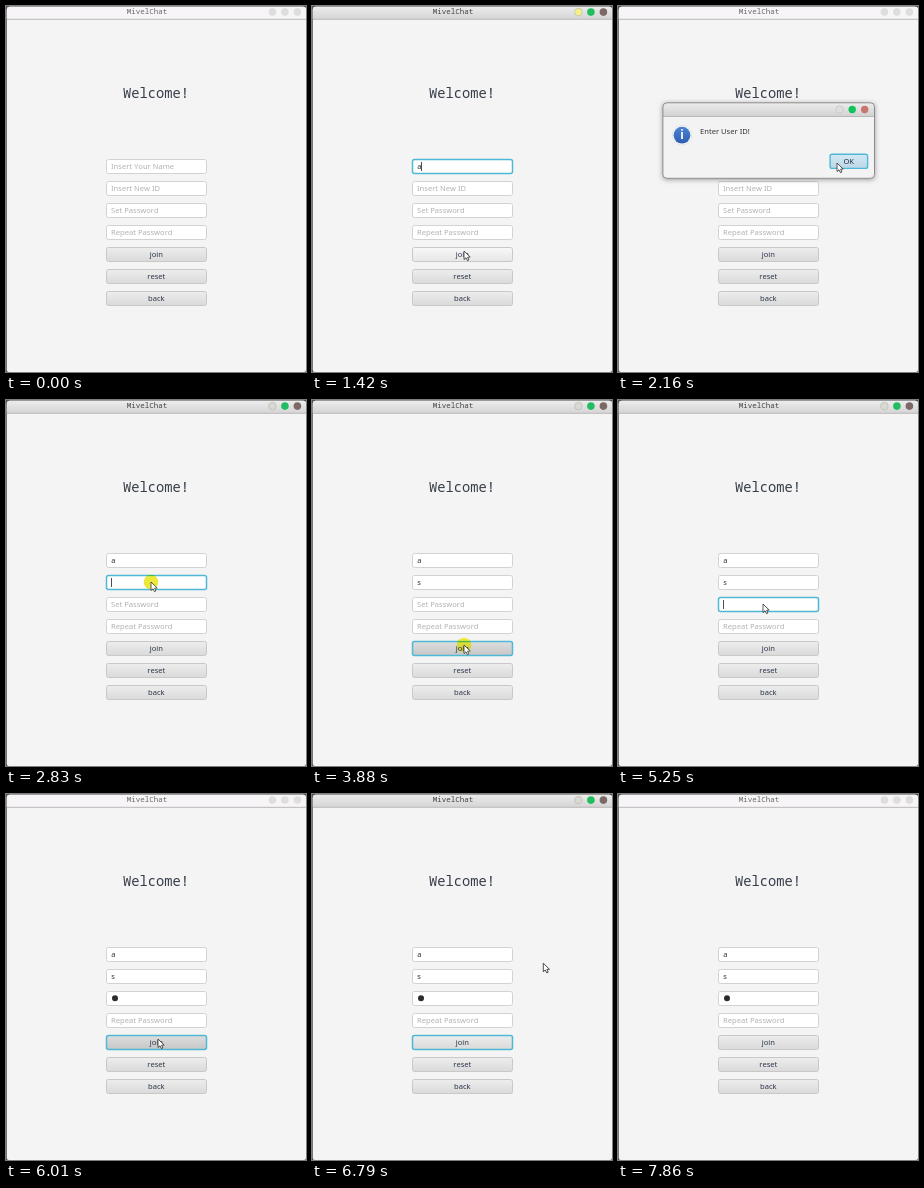
Animation, 300 px wide and 366 px high, one loop 7.96 s. Source, as an HTML page with a canvas:

```html
<!DOCTYPE html>
<html lang="en">
<head>
<meta charset="utf-8">
<title>Join form</title>
<style>
html, body { margin: 0; height: 100%; overflow: hidden; background: #f4f4f4; }
canvas { display: block; }
</style>
</head>
<body>
<canvas id="stage" width="300" height="366"></canvas>
<script>
const c = document.getElementById('stage').getContext('2d');
c.fontKerning = 'none';
const LOOP = 7960, SHOWN = 30, HIDDEN = 7860;
const SANS = '7.6px "Noto Sans", sans-serif';
const MONO = '"Noto Sans Mono", monospace';
const BLUE = '#4fb8d6';
const prompts = ['Insert Your Name', 'Insert New ID', 'Set Password', 'Repeat Password'];
const rowY = i => 153 + 22 * i;

// Each round: click a field, type one character, press join, then confirm the dialog if there is one.
const rounds = [
  { focus: 700, type: 930, join: 1570, end: 2530, char: 'a', ask: 'Enter User ID!', ok: [219, 157] },
  { focus: 2800, type: 3130, join: 3800, end: 4580, char: 's', ask: 'Enter User Password!', ok: [231, 163] },
  { focus: 5150, type: 5350, join: 5800, end: 6580, char: '●', ask: 'Repeat User Password!', ok: [229, 158] }
];
for (const round of rounds) {
  round.blur = round.join + 100;
  round.open = round.join + 220;
  round.press = round.end - 190;
}

const clamp = v => Math.max(0, Math.min(1, v));
const ease = u => u * u * (3 - 2 * u);
const within = (t, from, to) => t >= from && t < to;

// Pointer moves: [start, end, destination]
const moves = rounds.flatMap(({ focus, type, join, open, ok }, i) => [
  [i ? focus - 250 : SHOWN, focus - 30, [145, rowY(i) + 7]],
  [type + 100, type + 400, [152, 245]],
  [open + 30, open + 340, ok]
]);
moves.push([6650, 7660, [272, 370]]);

function pointerAt(t) {
  let x = 262, y = 366;
  for (const [from, to, [endX, endY]] of moves) {
    const k = ease(clamp((t - from) / (to - from)));
    x += (endX - x) * k;
    y += (endY - y) * k;
  }
  return [x, y];
}

function vertical(y, h, top, bottom) {
  const g = c.createLinearGradient(0, y, 0, y + h);
  g.addColorStop(0, top);
  g.addColorStop(1, bottom);
  return g;
}

function paint(fill, stroke, line = 1) {
  c.fillStyle = fill;
  c.fill();
  if (!stroke) return;
  c.strokeStyle = stroke;
  c.lineWidth = line;
  c.stroke();
}

function box(x, y, w, h, r, ...colors) {
  c.beginPath();
  c.roundRect(x, y, w, h, r);
  paint(...colors);
}

function dot(x, y, r, ...colors) {
  c.beginPath();
  c.arc(x, y, r, 0, 2 * Math.PI);
  paint(...colors);
}

function label(text, x, y, color, font = SANS, align = 'left') {
  c.font = font;
  c.textAlign = align;
  c.fillStyle = color;
  c.fillText(text, x, y);
}

function drawWindow(t, active) {
  c.fillStyle = '#555';
  c.fillRect(0, 0, 300, 366);
  box(0.8, 0.8, 299.2, 365.2, [3, 3, 2, 2], '#f4f4f4');
  box(0.8, 0.8, 299.2, 12.2, [3, 3, 0, 0], active ? vertical(0, 13, '#eeeeee', '#d6d4d6') : '#f7f5f7');
  c.fillStyle = '#bbb8b6';
  c.fillRect(1, 12.8, 299, 1);
  label('MivelChat', 141, 8.3, active ? '#444' : '#686868', `7.5px ${MONO}`, 'center');
  const minimize = t < rounds[0].blur ? '#f3f08c' : '#d8d8d4';
  [minimize, '#22bd60', '#7c6864'].forEach((color, i) =>
    dot(266.4 + 12.5 * i, 6.1, 3.8, active ? color : '#dedede', active && !i && '#bcbcae', 0.7));
  label('Welcome!', 150, 91.5, '#363d48', `13.75px ${MONO}`, 'center');
}

function drawField(prompt, i, t, focused) {
  const y = rowY(i), round = rounds[i];
  const text = round && t >= round.type ? round.char : '';
  const isDot = text === '●';
  box(100.5, y + 0.5, 100, 14, 2, '#fff', focused ? BLUE : '#d2d2d2', focused ? 1.5 : 1);
  if (isDot) dot(109, y + 7.3, 3, '#2c2c2c');
  else if (text) label(text, 105.3, y + 10.2, '#333');
  else if (!focused) label(prompt, 105, y + 10.2, '#b1b1b1');
  if (focused) {
    c.fillStyle = '#222';
    c.fillRect(105 + (isDot ? 8 : 4 * text.length), y + 3, 0.8, 9);
  }
}

function drawButton(text, y, top, bottom, focused) {
  box(100.5, y + 0.5, 100, 14, 2, vertical(y, 15, top, bottom), focused ? BLUE : '#c8c8c8', focused ? 1.5 : 1);
  label(text, 150.3, y + 10.1, '#2b3648', SANS, 'center');
}

function drawDialog({ open, press, end, ask }, t) {
  if (!within(t, open, end)) return;
  c.save();
  c.globalAlpha = clamp((t - open) / 110) * clamp((end - t) / 30);
  c.shadowColor = 'rgba(0,0,0,.4)';
  c.shadowBlur = 5;
  c.shadowOffsetY = 1;
  box(44.7, 96.5, 212, 76, 4, '#f3f3f3');
  c.shadowColor = 'transparent';
  box(45, 97, 211.4, 13, [4, 4, 0, 0], vertical(97, 13, '#ececec', '#d2d2d2'));
  c.fillStyle = '#b8b8b8';
  c.fillRect(45, 110, 211, 1);
  box(44.9, 96.8, 211.6, 75.5, 4, 'transparent', '#8c8c8c');
  ['#dedede', '#12c45c', '#cb7470'].forEach((color, i) =>
    dot(221.7 + 12.5 * i, 103.5, 3.7, color, !i && '#c2c2c2', 0.7));
  dot(64, 129.2, 9.8, '#fafafa', '#d8dbe0', 0.7);
  dot(64, 129.2, 8.4, vertical(121, 17, '#4c82d2', '#2e5db2'));
  label('i', 64, 133.4, '#fff', 'bold 11.5px "Noto Sans", sans-serif', 'center');
  label(ask, 82, 128.2, '#333');
  const fill = t < press ? vertical(148, 15, '#d6e9f3', '#b9d6e6') : vertical(148, 15, '#acd4e7', '#94c5dd');
  box(212.1, 148.2, 37.5, 14.2, 2, fill, BLUE, 1.4);
  label('OK', 230.7, 158.1, '#2b3648', SANS, 'center');
  c.restore();
}

function drawPointer(t) {
  if (!within(t, SHOWN, HIDDEN)) return;
  const [x, y] = pointerAt(t);
  c.save();
  c.translate(x, y);
  if (rounds.some(r => [r.focus, r.join, r.press].some(time => within(t, time, time + 85)))) {
    c.globalCompositeOperation = 'darken';
    dot(0, 0, 7.3, '#eee83c');
    c.globalCompositeOperation = 'source-over';
  }
  c.fill(arrow);
  c.beginPath();
  c.fillStyle = '#fff';
  c.fill(arrow);
  c.strokeStyle = '#333';
  c.lineWidth = 0.8;
  c.stroke(arrow);
  c.restore();
}
const arrow = new Path2D('M0 0V8.5L2 6.8 3.5 9.6 4.9 8.9 3.6 6.2 6.2 6Z');

function draw(t) {
  const active = within(t, SHOWN, HIDDEN) && !rounds.some(r => within(t, r.blur, r.end));
  const inDialog = rounds.some(r => within(t, r.open, r.end));
  const pressed = rounds.some(r => within(t, r.join, r.open));
  const hovered = within(t, rounds[0].type + 380, rounds[0].join);
  const typing = rounds.findIndex(r => within(t, r.focus, r.join));
  const joinFocused = typing < 0 && within(t, rounds[0].join, HIDDEN) && !inDialog;
  drawWindow(t, active);
  prompts.forEach((prompt, i) => drawField(prompt, i, t, typing === i));
  const face = ['#eeeeee', '#d9d9d9'];
  const joinFace = pressed ? ['#dedede', '#c6c6c6'] : hovered ? ['#f8f8f8', '#e6e6e6'] : face;
  drawButton('join', rowY(4), ...joinFace, joinFocused);
  drawButton('reset', rowY(5), ...face);
  drawButton('back', rowY(6), ...face);
  rounds.forEach(round => drawDialog(round, t));
  drawPointer(t);
}

const start = performance.now();
function frame() {
  draw((performance.now() - start) % LOOP);
  requestAnimationFrame(frame);
}
frame();
</script>
</body>
</html>
```
